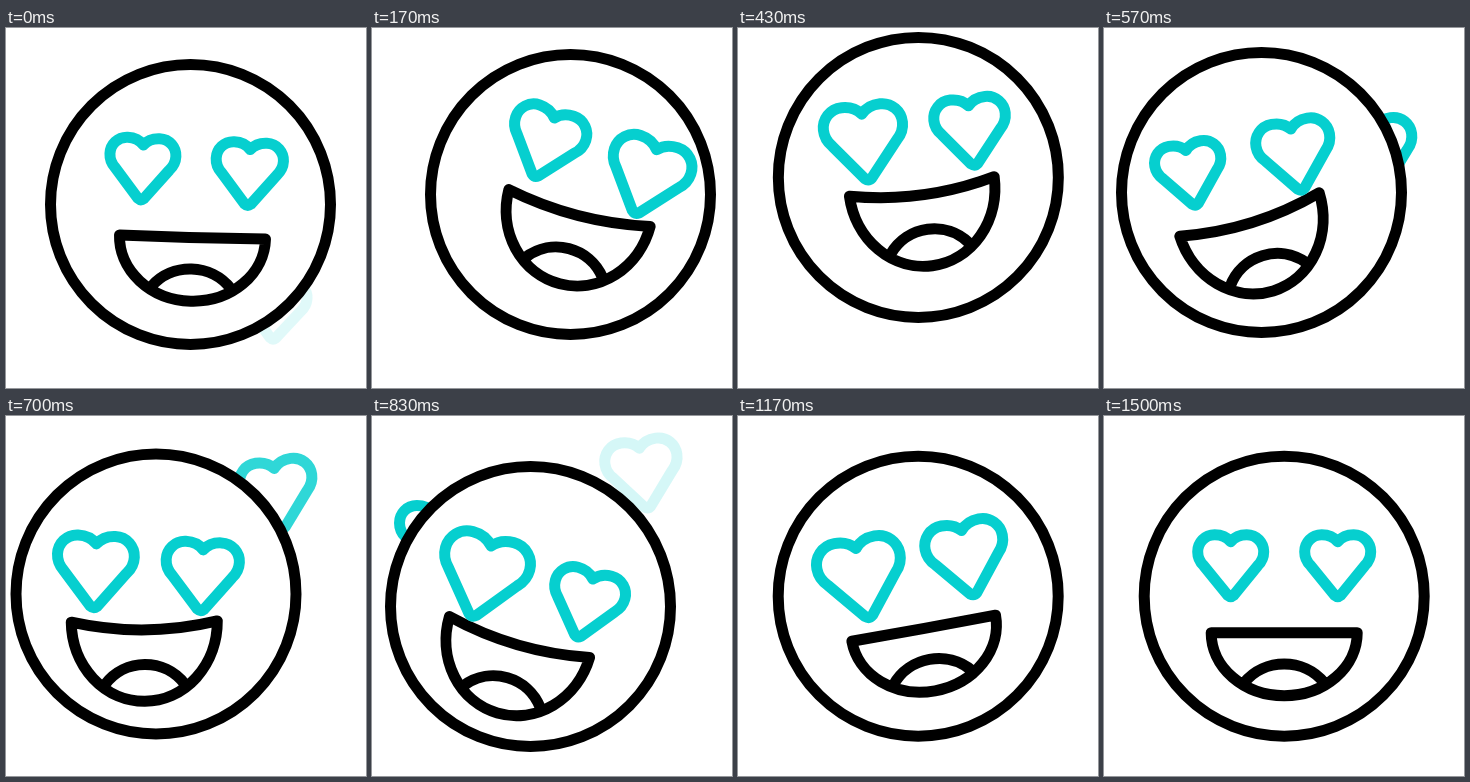
An HTML page with a canvas that plays this animation: 360 by 360 pixels, repeating every 1.67 s.

```html
<!DOCTYPE html>
<html lang="en">
<head>
<meta charset="utf-8">
<title>Heart eyes</title>
<style>
  html, body { margin: 0; width: 100%; height: 100%; overflow: hidden; background: #fff; }
  canvas { display: block; }
</style>
</head>
<body>
<canvas id="stage" width="360" height="360"></canvas>
<script>
const ctx = document.getElementById('stage').getContext('2d');
const LOOP = 1670, STEP = 33.4, REST = 45;
const TEAL = '#06cfcf';
const HEART = [
  'M0-24C5-30 11-31 16-31C26-31 33-23 33-14C33-8 31-4 27 0L3 29.5',
  'Q0 32-3 29.5L-27 0C-31-4-33-8-33-14C-33-23-26-31-16-31C-11-31-5-30 0-24Z'
].join('');

// step, x, y of the head
const headKeys = [
  [0, 184.5, 176.5], [5, 198.5, 166.5], [8, 202, 154], [10, 197.5, 149.5],
  [12, 187, 148], [16, 160.5, 161], [17, 157.5, 164.5], [21, 150, 178],
  [25, 158.5, 190.5], [33, 178.5, 182.5], [35, 180.2, 180.2], [45, 180.2, 180.2]
];
// step, eyes x, y, tilt, left and right eye scale, mouth x, y, tilt, openness
const featureKeys = [
  [0, 5.2, -33, 2.7, 1, 1.02, 2, 32.5, 1.6, 0.07],
  [5, 26, -34, 18.5, 1.12, 1.22, 9, 13.5, 14.6, 0.9],
  [10, 16, -46, 0, 1.33, 1.06, 13.5, 2.5, 2.8, 1],
  [17, -18.7, -27.4, -10, 1.01, 1.13, -12, 22, -17.3, 1],
  [25, 4, -16, 15, 1.32, 1.09, -11, 30.5, 16.3, 0.95],
  [35, -3.9, -27.5, -10.8, 1.28, 1.19, 5.5, 32, -10.3, 0.04],
  [45, 0, -30.5, 0, 1, 1, 0, 36.5, 0, 0]
];
const flyers = [
  { start: -11, end: 0.7, from: [225, 230], to: [269, 282], scale: 0.95, tilt: 4 },
  { start: 5, end: 11.5, from: [120, 225], to: [62, 264], scale: 1.16, tilt: 0 },
  { start: 14, end: 26, from: [276, 179], to: [271, 57.5], scale: 1.1, tilt: -8 },
  { start: 22, end: 33, from: [64, 165], to: [58, 72], scale: 1.02, tilt: 0 }
];

// Smooth interpolation that never overshoots a key
function sample(keys, t) {
  const last = keys.length - 2;
  let i = 0;
  while (i < last && t >= keys[i + 1][0]) i++;
  const a = keys[i], b = keys[i + 1], span = b[0] - a[0], u = (t - a[0]) / span;
  return a.slice(1).map((v, n) => {
    const c = n + 1;
    const slope = k => (keys[k + 1][c] - keys[k][c]) / (keys[k + 1][0] - keys[k][0]);
    const tangent = k => {
      if (k === 0) return slope(0);
      if (k > last) return 0;
      const p = slope(k - 1), q = slope(k);
      return p * q > 0 ? 2 * p * q / (p + q) : 0;
    };
    const w = 1 - u;
    return v * w * w * (1 + 2 * u) + b[c] * u * u * (3 - 2 * u)
      + span * u * w * (tangent(i) * w - tangent(i + 1) * u);
  });
}

function placed(x, y, tilt, draw) {
  ctx.save();
  ctx.translate(x, y);
  ctx.rotate(tilt * Math.PI / 180);
  draw();
  ctx.restore();
}

function heart(x, y, tilt, scale) {
  placed(x, y, tilt, () => {
    const path = new Path2D();
    path.addPath(new Path2D(HEART), new DOMMatrix().scale(scale));
    ctx.strokeStyle = TEAL;
    ctx.stroke(path);
  });
}

function mouth(open) {
  const depth = 63 + 17 * open, tongue = 50 + 13 * open, top = 31 + 11.5 * open;
  ctx.beginPath();
  ctx.moveTo(-73, 0);
  ctx.quadraticCurveTo(0, 17 * open, 73, 0);
  ctx.ellipse(0, 0, 73, depth, 0, 0, Math.PI);
  ctx.closePath();
  ctx.moveTo(-40, tongue);
  ctx.bezierCurveTo(-20, top - 6, 20, top - 6, 40, tongue);
  ctx.stroke();
}

function flyer({ start, end, from, to, scale, tilt }, t) {
  const p = (t - start) / (end - start);
  if (p < 0 || p >= 1) return;
  const [x, y] = from.map((v, i) => to[i] + (v - to[i]) * (1 - p) ** 2);
  ctx.globalAlpha = Math.min(1, 2 * (1 - p));
  heart(x, y, tilt, scale);
  ctx.globalAlpha = 1;
}

function render(t) {
  ctx.fillStyle = '#fff';
  ctx.fillRect(0, 0, 360, 360);
  ctx.lineWidth = 11;
  ctx.lineCap = ctx.lineJoin = 'round';
  flyers.forEach(f => flyer(f, t));

  const [x, y] = sample(headKeys, t);
  const [eyeX, eyeY, eyeTilt, left, right, mouthX, mouthY, mouthTilt, open] = sample(featureKeys, t);
  placed(x, y, 0, () => {
    ctx.strokeStyle = '#000';
    ctx.beginPath();
    ctx.arc(0, 0, 140, 0, 2 * Math.PI);
    ctx.fill();
    ctx.stroke();
    placed(mouthX, mouthY, mouthTilt, () => mouth(open));
    placed(eyeX, eyeY, eyeTilt, () => {
      heart(-53.5, 0, 0, left);
      heart(53.5, 0, 0, right);
    });
  });
}

function tick() {
  const time = performance.now() % LOOP;
  render(Math.min(REST, Math.floor(time / STEP + 0.15)));
  requestAnimationFrame(tick);
}
tick();
</script>
</body>
</html>
```
